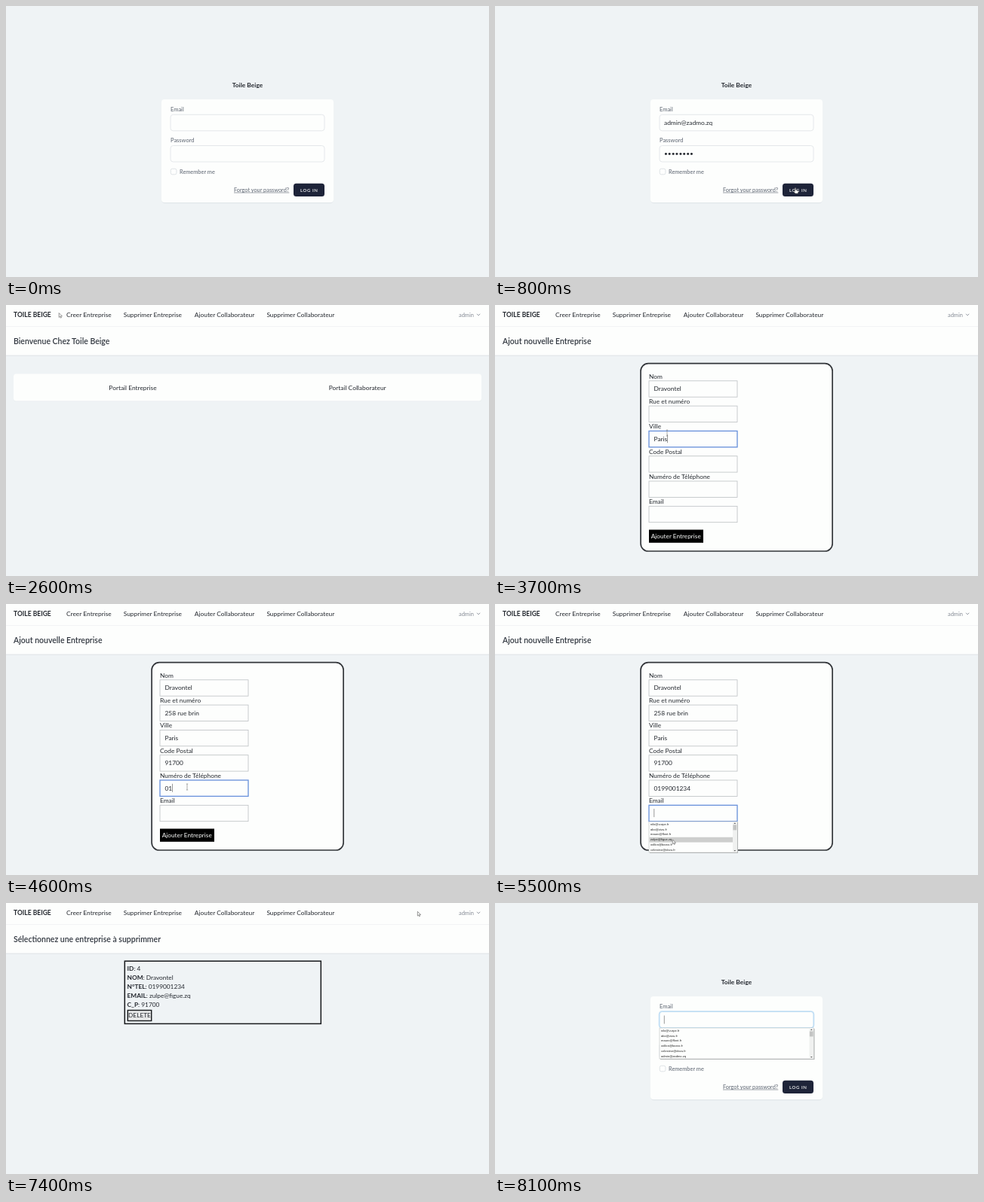
An HTML page that plays this animation: 640 px wide and 360 px high, repeating every 8.2 s.

```html
<!DOCTYPE html>
<html lang="fr">
<head>
<meta charset="utf-8">
<title>Toile Beige</title>
<style>
html, body { margin: 0; width: 100%; height: 100%; overflow: hidden; background: #eff3f5; }
svg { display: block; width: 100vw; height: 100vh; }
text { font-family: Lato, "Open Sans", sans-serif; white-space: pre; }
.tiny { font-family: "Liberation Sans", Arial, sans-serif; }
</style>
</head>
<body>
<svg id="stage" viewBox="0 0 640 360"></svg>
<script>
const stage = document.getElementById('stage');
const pen = document.createElement('canvas').getContext('2d');
const LOOP = 8200, STEP = 100;
const INK = '#24282f', SLATE = '#5b6370', PAPER = '#fdfefd', GROUND = '#eff3f5', SIZE = 8.38;

const BRAND = 'Toile Beige';
const FIRM = 'Dravontel', PHONE = '0199001234', MAIL = 'zulpe@figue.zq', ADMIN = 'admin@zadmo.zq';
const MAILS = ['nilo@vurpe.fr', 'abo@zizu.fr', 'mauro@flont.fr', MAIL, 'odilon@barvo.fr', 'celestine@dovu.fr'];
const LOGINS = [...MAILS.filter(m => m !== MAIL), ADMIN];

// label, value, first step, characters per step
const FIELDS = [
  ['Nom', FIRM, 32, 3],
  ['Rue et numéro', '258 rue brin', 39, 3],
  ['Ville', 'Paris', 36, 3],
  ['Code Postal', '91700', 43, 2],
  ['Numéro de Téléphone', PHONE, 46, 2],
  ['Email', MAIL, 56, 20]
];
const COMPANIES = [
  [3, 'Zulpe', '+33199004567', MAILS[0]],
  [4, FIRM, PHONE, MAIL]
];

// step, x, y, pointer kind
const PATH = [
  [1, 240, 158, 'beam'], [2, 236, 180, 'arrow'], [3, 234, 202, 'arrow'], [5, 250, 196, 'beam'],
  [7, 330, 215, 'arrow'], [8, 398, 242, 'hand'], [10, 395, 242, 'arrow'], [15, 177, 106.5, 'hand'],
  [18, 177, 106.5, 'hand'], [19, 250, 108, 'arrow'], [21, 470, 107, 'hand'], [23, 440, 100, 'arrow'],
  [26, 70.2, 10.6, 'arrow'], [28, 100, 12, 'hand'], [29, 110, 14, 'arrow'], [32, 230, 110, 'beam'],
  [35, 228, 170, 'beam'], [38, 228, 170, 'beam'], [39, 240, 144, 'beam'], [42, 240, 144, 'beam'],
  [43, 240, 210, 'beam'], [45, 240, 220, 'beam'], [46, 240, 243, 'beam'], [52, 240, 262, 'beam'],
  [53, 240, 277, 'beam'], [54, 238, 300, 'arrow'], [55, 235.3, 313, 'arrow'], [57, 240, 305, 'hand'],
  [58, 240, 305, 'hand'], [60, 195, 12, 'hand'], [61, 195, 14, 'arrow'], [64, 180, 90, 'arrow'],
  [66, 172, 147, 'hand'], [68, 172, 147, 'hand'], [69, 172, 147, 'arrow'], [72, 412, 12, 'arrow'],
  [75, 612, 11, 'hand'], [76, 612, 11, 'hand'], [78, 420, 90, 'arrow'], [79, 270, 153, 'beam']
];

const typed = (s, k, start, rate) => k < start ? '' : s.slice(0, (k - start + 1) * rate);

function text(x, y, s, size = SIZE, fill = INK, extra = '') {
  return `<text x="${x}" y="${y}" font-size="${size}" fill="${fill}" ${extra}>${s}</text>`;
}
function rect(x, y, w, h, fill, stroke = 'none', sw = 1, r = 0) {
  return `<rect x="${x}" y="${y}" width="${w}" height="${h}" rx="${r}" fill="${fill}" stroke="${stroke}" stroke-width="${sw}"/>`;
}
function line(d, stroke, w = 1, extra = '') {
  return `<path d="${d}" fill="none" stroke="${stroke}" stroke-width="${w}" ${extra}/>`;
}
const centred = 'text-anchor="middle"';

function caret(x, y, s) {
  pen.font = `${SIZE}px Lato, "Open Sans", sans-serif`;
  return line(`M${x + pen.measureText(s).width + .3} ${y}v11`, '#555', .6);
}

function suggestions(x, y, w, list, chosen) {
  let out = rect(x + 1, y + 1, w, 41, '#b4b6b6') + rect(x, y, w, 41, PAPER, '#b4b6b6', .5);
  if (chosen >= 0) out += rect(x + .5, y + .2 + chosen * 6.85, w - 6.5, 6.8, '#cdcecd');
  list.forEach((m, i) => out += text(x + 2, y + 4.7 + i * 6.85, m, 4.1, '#222', 'class="tiny"'));
  const sx = x + w - 6;
  out += rect(sx, y + .4, 5.5, 40.2, '#f0f1f0') + rect(sx + .4, y + 4.4, 4.7, 7, '#c4c5c4');
  out += `<path d="M${sx + 1.5} ${y + 3}h2.6l-1.3-1.6zM${sx + 1.5} ${y + 38}h2.6l-1.3 1.6z" fill="#555"/>`;
  return out;
}

function login(k) {
  const again = k >= 78;
  const mail = !again && k >= 4 ? ADMIN : '';
  const dots = again ? '' : '•'.repeat(Math.max(0, Math.min(8, (k - 4) * 4)));
  const focus = again ? (k >= 80 ? 0 : -1) : k < 1 ? -1 : k < 5 ? 0 : k < 8 ? 1 : -1;
  const box = (i, y) => (focus === i ? rect(217.6, y - .4, 204.8, 22.4, 'none', '#d6e9f8', 2, 4) : '') +
    rect(218, y, 204, 21.5, PAPER, focus === i ? '#a3d0ef' : '#dfe3e6', .8, 3.5);
  let out = text(320, 108.2, BRAND, 8.4, INK, centred + ' font-weight="700"');
  out += rect(206, 125.3, 228, 137, '#e1e6e9', 'none', 0, 4.5) + rect(206, 124, 228, 137, PAPER, 'none', 0, 4);
  out += text(218, 139.6, 'Email', 7.5, SLATE) + box(0, 144.3);
  out += text(218, 181, 'Password', 7.5, SLATE) + box(1, 185.5);
  out += text(224, 157.8, mail) + text(224, 199, dots);
  out += rect(218.3, 216.2, 7.6, 7.6, PAPER, '#d9dde1', .8, 2);
  out += text(230, 222.5, 'Remember me', 7.4, SLATE);
  out += text(302, 246.5, 'Forgot your password?', 7.35, SLATE) + line('M302 248h73.3', SLATE, .6);
  out += rect(381, 235.8, 41, 17.2, '#1e2439', 'none', 0, 3.5);
  out += text(401.8, 246.5, 'LOG IN', 6, PAPER, centred + ' font-weight="600" letter-spacing=".6"');
  if (focus === 0) out += caret(224, 149.5, mail);
  if (focus === 1) out += caret(224, 190.7, dots);
  if (focus === 0 && !mail) out += suggestions(218, 166, 204.5, LOGINS, k === 3 ? 5 : -1);
  return out;
}

function shell(title) {
  let out = rect(0, 66.5, 640, 1.2, '#e1e5e7') + rect(0, 0, 640, 66.5, PAPER) + line('M0 28.5H640', '#f2f4f5');
  out += text(10, 15.6, BRAND.toUpperCase(), 8.5, INK, 'font-weight="700"');
  [[80, 'Creer Entreprise'], [155.7, 'Supprimer Entreprise'], [249.8, 'Ajouter Collaborateur'],
   [345.4, 'Supprimer Collaborateur']].forEach(([x, s]) => out += text(x, 15.6, s));
  out += text(600, 15.6, 'admin', 7.4, '#858b95') + line('M624 11.8l2.1 2.1 2.1-2.1', '#858b95', .9);
  return out + text(10, 51.6, title, 10.5, '#30363f', 'font-weight="600"');
}

function home() {
  return shell('Bienvenue Chez ' + BRAND) + rect(10, 92, 620, 36.3, '#e7ebed', 'none', 0, 3.5) +
    rect(10, 91.5, 620, 36, PAPER, 'none', 0, 3.5) +
    text(168, 112.6, 'Portail Entreprise', SIZE, INK, centred) +
    text(465.7, 112.6, 'Portail Collaborateur', SIZE, INK, centred);
}

function form(k) {
  const sent = k >= 59;
  const focus = sent || k < 32 ? -1 : k < 36 ? 0 : k < 39 ? 2 : k < 43 ? 1 : k < 46 ? 3 : k < 53 ? 4 : k < 57 ? 5 : -1;
  let out = shell('Ajout nouvelle Entreprise') + rect(193.1, 77.6, 254, 249.4, PAPER, '#33363a', 1.7, 10);
  FIELDS.forEach(([label, value, start, rate], i) => {
    const y = 97.6 + i * 33.3, on = focus === i;
    const s = sent ? '' : typed(value, k, start, rate);
    out += text(204, y, label) + rect(204, y + 3.2, 117, 21.4, PAPER, on ? '#668fdb' : '#bcc0c3', on ? 1.3 : .8);
    out += text(210.5, y + 16.8, s);
    if (on) out += caret(210.5, y + 8, s);
  });
  out += rect(204, 298.5, 72, 17.3, '#000') + text(206.8, 310.2, 'Ajouter Entreprise', 8.25, PAPER);
  if (k >= 53 && k < 56) out += suggestions(204, 289, 117, MAILS, k === 55 ? 3 : -1);
  return out;
}

function list(k) {
  let out = shell('Sélectionnez une entreprise à supprimmer');
  COMPANIES.slice(k >= 69 ? 1 : 0).forEach(([id, name, tel, mail], i) => {
    const y = 77.2 + i * 94.2;
    out += rect(157.3, y, 260, 83.2, 'none', '#17191c', 1.5);
    [['ID', id], ['NOM', name], ['N°TEL', tel], ['EMAIL', mail], ['C_P', 91700]].forEach(([key, v], n) =>
      out += text(160.6, y + 12.3 + n * 12.2, `<tspan font-weight="700">${key}</tspan>: ${v}`, 8.3));
    out += rect(161.3, y + 65.3, 31.4, 14, '#e7e8e8', '#17191c', 1.4) + text(177, y + 75.2, 'DELETE', 8.3, INK, centred);
  });
  return out;
}

// link preview in the lower left corner while a link is hovered
function status(k) {
  const w = k >= 15 && k <= 18 ? 47 : k >= 21 && k <= 22 ? 52 : k === 28 ? 50 : k === 60 ? 58 : k >= 66 && k <= 68 ? 83.5 : 0;
  return w ? rect(0, 356.3, w, 4, '#34363a') + line(`M2 359.3H${w * .75}`, '#a5a7aa', .7, 'stroke-dasharray="2 1 1 1.5"') : '';
}

function pointer(k) {
  if (k < PATH[0][0] || k >= 80) return '';
  const n = PATH.findIndex(p => p[0] > k);
  const a = PATH[n < 0 ? PATH.length - 1 : n - 1], b = n < 0 ? a : PATH[n];
  const u = n < 0 ? 0 : (k - a[0]) / (b[0] - a[0]);
  const x = a[1] + (b[1] - a[1]) * u, y = a[2] + (b[2] - a[2]) * u;
  const kind = u > 0 && a[3] !== b[3] ? 'arrow' : a[3];
  const at = d => `<path transform="translate(${x} ${y})" d="${d}" fill="${PAPER}" stroke="#555" stroke-width=".6" stroke-linejoin="round"/>`;
  if (kind === 'beam') return line(`M${x - 1.2} ${y - 4}h2.4m-1.2 0v8m-1.2 0h2.4`, '#777', .6);
  if (kind === 'hand') return at('M-.7 0q.7-.8 1.4 0v2.6l2.6.6q.8.3.7 1.3l-.6 2.5h-3.6l-2.3-2.7q.3-.9 1.2-.3l.6.5z');
  return at('M0 0v5.8l1.4-1.2.9 2 .9-.5-.9-1.9h1.9z');
}

function scene(k) {
  const page = k < 10 || k >= 78 ? login(k) : k < 29 ? home() : k < 61 ? form(k) : list(k);
  return rect(0, 0, 640, 360, GROUND) + page + status(k) + pointer(k);
}

let shown = -1;
const begin = performance.now();
function draw() {
  const k = Math.floor(((performance.now() - begin) % LOOP) / STEP);
  if (k !== shown) stage.innerHTML = scene(shown = k);
  requestAnimationFrame(draw);
}
draw();
</script>
</body>
</html>
```
